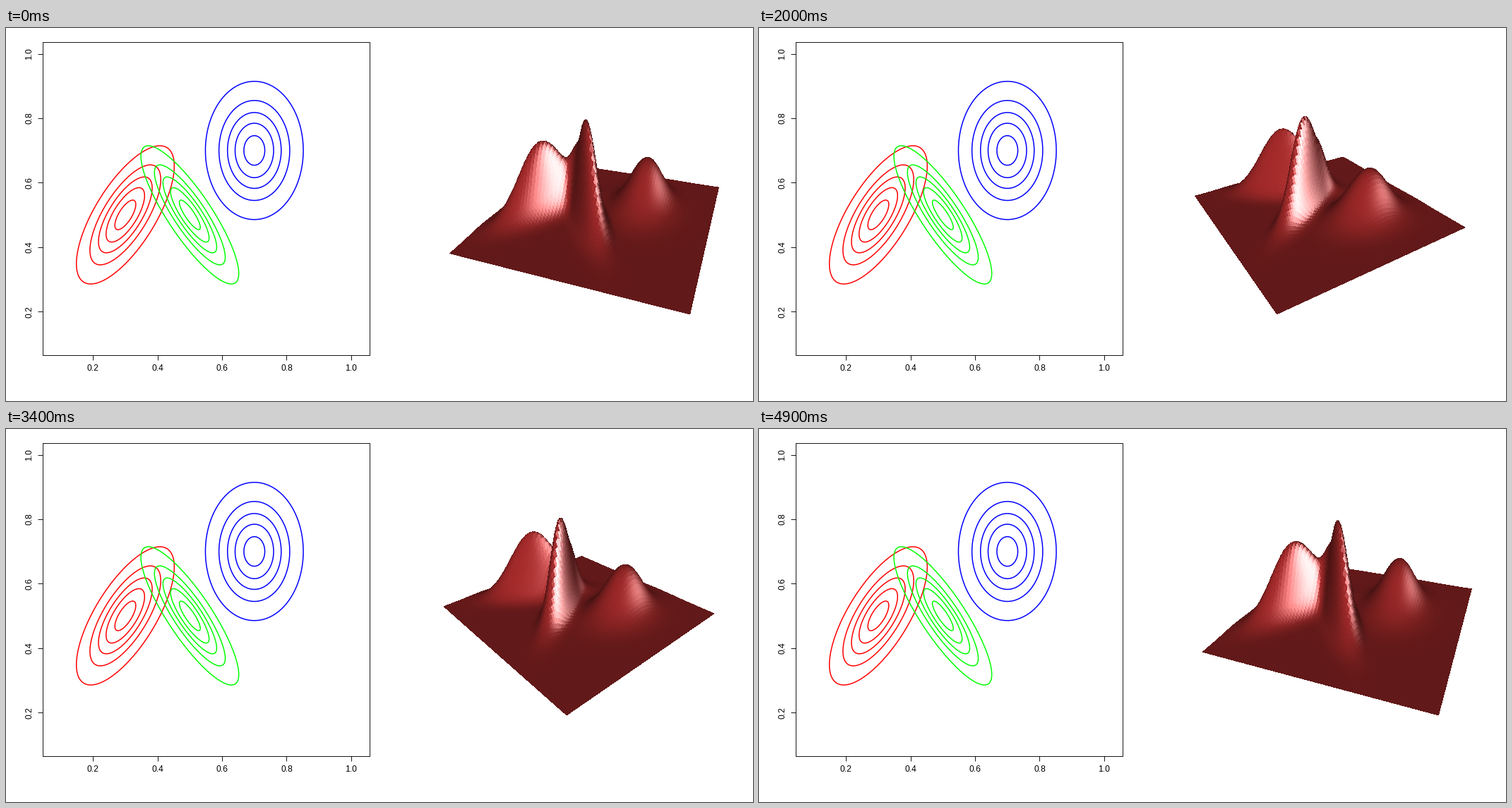
A matplotlib script for the animation above (5000 ms loop, 1058 px wide and 529 px high).

```python
import numpy as np
import matplotlib
import matplotlib.pyplot as plt
from matplotlib.animation import FuncAnimation
from matplotlib.collections import PolyCollection

matplotlib.rcParams["font.family"] = "Liberation Sans"

W, H, DPI = 1058, 529, 100
PT = 72 / DPI                      # points per pixel
ROW = 14.4                         # one margin line in pixels
LEFT, RIGHT = 3.6 * ROW, W / 2 - ROW
TOP, BOTTOM = 1.4 * ROW, H - 4.5 * ROW
MID_X, MID_Y = (LEFT + RIGHT) / 2, (TOP + BOTTOM) / 2
UNIT = (BOTTOM - TOP) / (0.9 * 1.08)   # pixels per data unit

# centre, covariance term, colour; both variances are shared
VX, VY = 0.005, 0.01
PARTS = [((0.3, 0.5), 0.005, "#ff0000"),
         ((0.5, 0.5), -0.006, "#00ff00"),
         ((0.7, 0.7), 0.0, "#0000ff")]

fig = plt.figure(figsize=(W / DPI, H / DPI), dpi=DPI, facecolor="white")
ax = fig.add_axes([0, 0, 1, 1])
ax.set_xlim(0, W)
ax.set_ylim(H, 0)
ax.axis("off")


# ---------- left: confidence ellipses ----------
def px(x):
    return MID_X + (x - 0.55) * UNIT


def py(y):
    return MID_Y - (y - 0.55) * UNIT


def line(xs, ys, color="black", width=0.9):
    ax.plot(xs, ys, color=color, lw=width * PT, solid_capstyle="butt")


def draw_axes():
    line([LEFT, RIGHT, RIGHT, LEFT, LEFT], [TOP, TOP, BOTTOM, BOTTOM, TOP])
    font = dict(fontsize=12 * PT, ha="center", va="center")
    for v in (0.2, 0.4, 0.6, 0.8, 1.0):
        x, y = px(v), py(v)
        line([x, x], [BOTTOM, BOTTOM + ROW / 2])
        line([LEFT, LEFT - ROW / 2], [y, y])
        ax.text(x, 483, f"{v:.1f}", **font)
        ax.text(33.2, y, f"{v:.1f}", rotation=90, **font)


def draw_ellipses():
    a = np.linspace(0, 2 * np.pi, 200)
    for (cx, cy), cov, color in PARTS:
        lag = np.arccos(cov / np.sqrt(VX * VY))
        for p in (0.1, 0.3, 0.5, 0.7, 0.9):
            k = np.sqrt(-2 * np.log(1 - p))
            line(px(cx + k * np.sqrt(VX) * np.cos(a)),
                 py(cy + k * np.sqrt(VY) * np.cos(a - lag)), color, 1.5)


# ---------- right: shaded density surface ----------
N = 91
PHI = np.radians(25)
SIN, COS = np.sin(PHI), np.cos(PHI)
DIST = np.sqrt(3) + 2
HALF = 0.5                         # half height of the surface box
REGION = (RIGHT - LEFT) / 1.08
CENTRE = (W / 2 + MID_X, MID_Y)


def density(x, y):
    z = np.zeros_like(x)
    for (cx, cy), cov, _ in PARTS:
        dx, dy = x - cx, y - cy
        det = VX * VY - cov ** 2
        q = (VY * dx ** 2 - 2 * cov * dx * dy + VX * dy ** 2) / det
        z += np.exp(-q / 2) / np.sqrt(det)
    return z


grid = np.linspace(0.1, 1, N)
GX, GY = np.meshgrid(grid, grid)
GZ = density(GX, GY)
GZ = (GZ - GZ.min()) / np.ptp(GZ) * 2 * HALF - HALF
GX, GY = (GX - 0.55) / 0.45, (GY - 0.55) / 0.45

CORNERS = np.array([(x, y, z) for x in (-1, 1) for y in (-1, 1)
                    for z in (-HALF, HALF)]).T


def quads(a):
    return np.stack([a[:-1, :-1], a[:-1, 1:], a[1:, 1:], a[1:, :-1]], axis=-1)


def facet_normals(relief=0.5):
    p = np.stack([quads(GX), quads(GY), quads(GZ) * relief], axis=-1)
    n = np.cross(p[..., 2, :] - p[..., 0, :], p[..., 3, :] - p[..., 1, :])
    n /= np.linalg.norm(n, axis=-1, keepdims=True)
    return n.reshape(-1, 3)


def direction(azimuth, elevation):
    """Unit vector as (right, toward the viewer, up)."""
    a, e = np.radians([azimuth, elevation])
    return np.array([np.sin(a) * np.cos(e), np.cos(a) * np.cos(e), np.sin(e)])


NORMALS = facet_normals()
BROWN = np.array([165, 42, 42]) / 255
VIEW = direction(0, 25)
GLINT = direction(47, 25)


def turn(x, y, theta):
    c, s = np.cos(theta), np.sin(theta)
    return x * c + y * s, x * s - y * c


def project(x, y, z, theta):
    u, t = turn(x, y, theta)
    depth = DIST - t * COS - z * SIN
    return u / depth, (z * COS - t * SIN) / depth, depth


def shade(theta):
    u, t = turn(NORMALS[:, 0], NORMALS[:, 1], theta)
    n = np.stack([u, t, NORMALS[:, 2]], axis=-1)
    diffuse = 0.3 + 0.7 * np.clip(n @ VIEW, 0, 1)
    gloss = 0.83 * np.clip(n @ GLINT, 0, 1) ** 14
    return np.clip(diffuse[:, None] * BROWN + gloss[:, None], 0, 1)


def angle(i):
    deg = 20 + 45 * i / 24 if i < 25 else 64 - 43 * (i - 25) / 24
    return np.radians(deg)


draw_axes()
draw_ellipses()
surface = PolyCollection([], linewidths=0, edgecolors="none",
                         antialiaseds=False, snap=False)
ax.add_collection(surface, autolim=False)


def update(i):
    theta = angle(i)
    bx, by, _ = project(*CORNERS, theta)
    scale = REGION / np.ptp(bx)
    mx, my = (bx.min() + bx.max()) / 2, (by.min() + by.max()) / 2
    x, y, depth = project(GX, GY, GZ, theta)
    sx = CENTRE[0] + (x - mx) * scale
    sy = CENTRE[1] - (y - my) * scale
    order = np.argsort(-quads(depth).mean(axis=-1).ravel())
    verts = np.stack([quads(sx), quads(sy)], axis=-1).reshape(-1, 4, 2)
    surface.set_verts(verts[order])
    surface.set_facecolor(shade(theta)[order])
    return (surface,)


anim = FuncAnimation(fig, update, frames=50, interval=100, repeat=True,
                     repeat_delay=0, init_func=lambda: update(0), blit=False)
plt.show()
```
